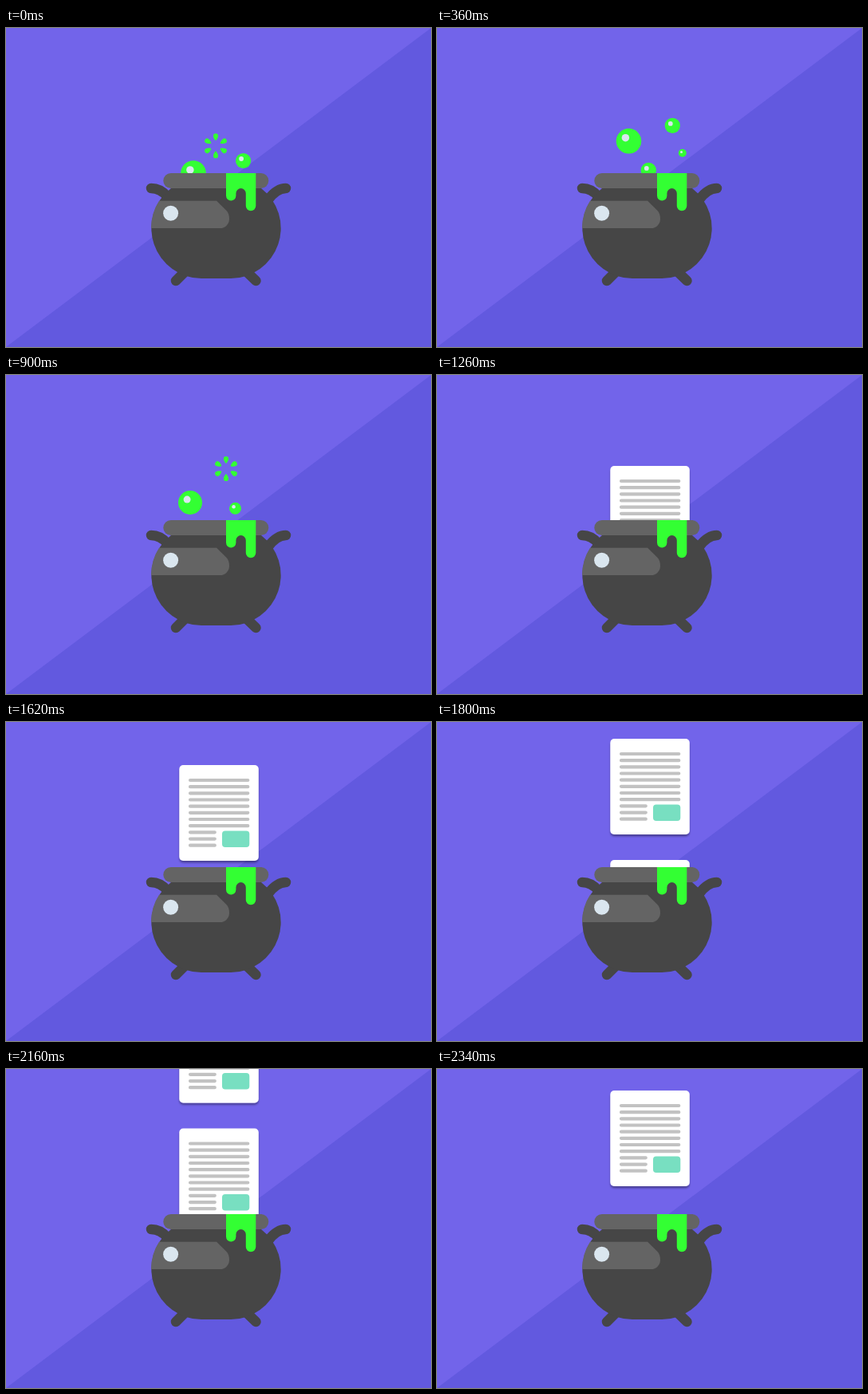
An HTML page that plays this animation: 533 by 400 pixels, repeating every 2520 ms.

```html
<!DOCTYPE html>
<html lang="en">
<head>
<meta charset="utf-8">
<title>Bubbling cauldron</title>
<style>
  html, body { margin: 0; width: 100%; height: 100%; overflow: hidden; background: #7264ea; }
  svg { display: block; width: 100%; height: 100%; }
</style>
</head>
<body>
<svg viewBox="0 0 533 400" preserveAspectRatio="none">
  <defs>
    <clipPath id="above"><path d="M0 0H533V182H0z"/></clipPath>
    <filter id="shadow" x="-10%" y="-10%" width="120%" height="120%">
      <feDropShadow dx="0" dy="2.5" stdDeviation="1.3" flood-color="#000" flood-opacity=".35"/>
    </filter>
    <g id="burst" fill="#3f3"></g>
    <g id="sheet">
      <rect x="217.3" width="99.5" height="120" rx="5" fill="#fff" filter="url(#shadow)"/>
      <path id="lines" stroke="#c2c2c2" stroke-width="4.2" stroke-linecap="round"/>
      <rect x="271" y="82.5" width="34.3" height="20.5" rx="4" fill="#78dfc1"/>
    </g>
  </defs>

  <path d="M0 0H533V400H0z" fill="#7264ea"/>
  <path d="M533 0V400H0z" fill="#6259df"/>

  <g clip-path="url(#above)">
    <g id="bubbles"></g>
    <g id="sheets"></g>
  </g>

  <g fill="none" stroke="#464646" stroke-width="12.5" stroke-linecap="round">
    <path d="M182 201C191 201 197 205 202 211M351 201C342 201 335 207 329 215"/>
    <path d="M213 317L227 303M313.5 317L299 303"/>
  </g>
  <path d="M207 201A63 63 0 0 0 245 314H282A63 63 0 0 0 320 201z" fill="#464646"/>
  <path d="M192 216.7H264L276 228.5C279 231.5 280 235 280 239.5A11.5 11.5 0 0 1 268.5 251H182A63 63 0 0 1 192 216.7z" fill="#646464"/>
  <circle cx="206.6" cy="232.3" r="9.5" fill="#dae6ef"/>
  <rect x="197.3" y="182" width="132" height="19" rx="9.5" fill="#646464"/>
  <path d="M276 182H313.3V223A6.2 6.2 0 0 1 300.8 223V207.3A6.2 6.2 0 0 0 288.4 207.3V210.3A6.2 6.2 0 0 1 276 210.3z" fill="#3f3"/>
</svg>

<script>
const STEP = 180, STEPS = 14, PITCH = 152;
const $ = id => document.getElementById(id);

// Each bubble: first step, radius, then its successive positions.
const bubbles = [
  { from: 0, r: 15.8, path: [[235, 182], [236, 162], [240.5, 141.8], [238, 136]] },
  { from: 0, r: 9.6, path: [[297.6, 166.5], [297, 129], [295.3, 122.4]] },
  { from: 1, r: 5, path: [[313, 171], [307.8, 156.8]] },
  { from: 2, r: 9.6, path: [[265.3, 178.4], [270, 150], [275, 122.6]] },
  { from: 3, r: 15, path: [[231, 181], [231, 160], [231, 160], [228.5, 140]] },
  { from: 4, r: 7.5, path: [[287.5, 167.3], [287.5, 167.3], [287, 148]] }
];

// Pops last one step each: [x, y] by step.
const pops = { 0: [263, 147.8], 3: [304, 128.5], 4: [236, 143], 5: [276, 117.5] };

// Top edge of the first sheet, starting at step 6.
const RISE = 6, tops = [146, 114, 91, 54, 21, -30, -77.5, -125];

const petal = 'M-.9 -7.2C-1.6 -8.7 -3.1 -10.2 -3.1 -12.4A3.1 3.1 0 0 1 3.1 -12.4C3.1 -10.2 1.6 -8.7 .9 -7.2Q0 -6.3 -.9 -7.2z';
$('burst').innerHTML = [0, 60, 120, 180, 240, 300]
  .map(a => `<path d="${petal}" transform="rotate(${a})"/>`).join('');

$('lines').setAttribute('d', Array.from({ length: 11 },
  (_, i) => `M231 ${19 + 8.17 * i}H${i < 8 ? 303.3 : 261.8}`).join(''));

const ball = (x, y, r) =>
  `<circle cx="${x}" cy="${y}" r="${r}" fill="#3f3"/>` +
  `<circle cx="${x - r * .26}" cy="${y - r * .26}" r="${r * .3}" fill="#dae6ef"/>`;

const place = (id, x, y) => `<use href="#${id}" transform="translate(${x} ${y})"/>`;

function draw(step) {
  let air = '';
  for (const { from, r, path } of bubbles) {
    const p = path[step - from];
    if (p) air += ball(p[0], p[1], r);
  }
  if (pops[step]) air += place('burst', ...pops[step]);
  $('bubbles').innerHTML = air;

  const top = tops[step - RISE];
  $('sheets').innerHTML = top === undefined ? '' :
    place('sheet', 0, top + PITCH) + place('sheet', 0, top);
}

let start, shown = -1;
function tick(now) {
  start ??= now;
  const step = Math.floor((now - start) / STEP) % STEPS;
  if (step !== shown) draw(shown = step);
  requestAnimationFrame(tick);
}
draw(0);
requestAnimationFrame(tick);
</script>
</body>
</html>
```
